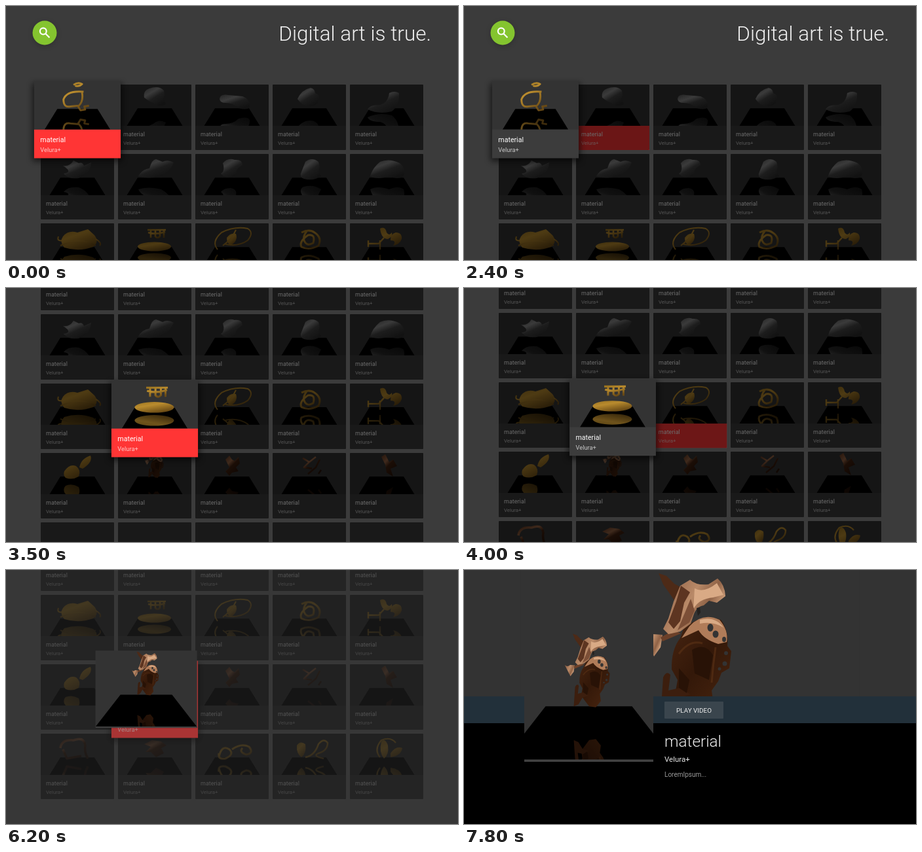
These frames come from a looping animation (690 by 388 pixels, 8100 ms). An HTML page:

```html
<!DOCTYPE html>
<html lang="en">
<head>
<meta charset="utf-8">
<title>Art gallery</title>
<style>
  html, body { margin: 0; width: 100%; height: 100%; overflow: hidden; background: #3b3b3b; }
  #stage { display: block; width: 100vw; height: 100vh; font-family: Roboto, sans-serif; }
</style>
</head>
<body>
<svg id="stage" viewBox="0 0 690 388">
  <defs>
    <linearGradient id="silver" x2=".7" y2="1">
      <stop offset="0" stop-color="#555"/><stop offset=".35" stop-color="#8c8c8c"/>
      <stop offset=".6" stop-color="#444"/><stop offset="1" stop-color="#2a2a2a"/>
    </linearGradient>
    <linearGradient id="gold" x2=".6" y2="1">
      <stop offset="0" stop-color="#99721f"/><stop offset=".4" stop-color="#ba8c2e"/>
      <stop offset="1" stop-color="#694a15"/>
    </linearGradient>
    <linearGradient id="copper" x2=".7" y2="1">
      <stop offset="0" stop-color="#5c321c"/><stop offset=".35" stop-color="#966444"/>
      <stop offset=".55" stop-color="#40200f"/><stop offset="1" stop-color="#281207"/>
    </linearGradient>
    <linearGradient id="sheet" x2="1" y2=".5">
      <stop offset="0" stop-color="#8a5a40"/><stop offset=".5" stop-color="#b98a68"/>
      <stop offset=".75" stop-color="#8f6246"/><stop offset="1" stop-color="#e0b08a"/>
    </linearGradient>
    <linearGradient id="body" x2=".8" y2="1">
      <stop offset="0" stop-color="#482511"/><stop offset=".5" stop-color="#331809"/>
      <stop offset="1" stop-color="#47240f"/>
    </linearGradient>
    <clipPath id="floor"><path d="M28 37.5H84L112 73.5H0Z"/></clipPath>
    <filter id="soft" x="-20%" y="-20%" width="140%" height="140%">
      <feGaussianBlur stdDeviation="4"/>
    </filter>
    <g id="arts"></g>
  </defs>

  <rect width="690" height="388" fill="#3b3b3b"/>
  <g id="grid"></g>
  <g id="header">
    <circle cx="59" cy="43" r="18" opacity=".22" filter="url(#soft)"/>
    <circle cx="59" cy="41" r="18.5" fill="#84c42f"/>
    <g fill="none" stroke="#fff" stroke-width="2.2">
      <circle cx="56.8" cy="38.6" r="4.9"/><path d="M60.4 42.2L66.4 48.2"/>
    </g>
    <text x="649" y="53" font-size="31.5" font-weight="300" text-anchor="end" fill="#f0f0f0">Digital art is true.</text>
  </g>

  <rect id="veil" width="690" height="388" fill="#333"/>
  <g id="backdrop"></g>
  <g id="panel">
    <rect y="193" width="690" height="41" fill="#22303a"/>
    <rect y="234" width="690" height="400" fill="#000"/>
    <rect x="306" y="201" width="90" height="26" rx="1" fill="#3a454d"/>
    <text x="351" y="218" font-size="9.9" text-anchor="middle" fill="#f0f0f0">PLAY VIDEO</text>
    <text x="306" y="270" font-size="24.3" font-weight="300" fill="#eee">material</text>
    <text x="306" y="293" font-size="11.5" fill="#e6e6e6">Velura+</text>
    <text x="306" y="316" font-size="10" fill="#999">LoremIpsum...</text>
  </g>
  <g id="hero"></g>
</svg>

<script>
const LOOP = 8100, COLS = 5, ROWS = 5;
const RED = '#ff3535', GREY = '#3c3c3c';
const $ = id => document.getElementById(id);
const clamp = x => Math.max(0, Math.min(1, x));
const ramp = (t, start, span) => clamp((t - start) / span);
const easeOut = x => 1 - (1 - x) ** 3;
const easeBoth = x => x < .5 ? 2 * x * x : 1 - 2 * (1 - x) ** 2;
const mix = (a, b, p) => a + (b - a) * p;

// Sculptures: material, filled outline, wire, wire width
const solid = (tone, fill) => [tone, fill, '', 0];
const wire = (tone, line, width = 3) => [tone, '', line, width];

const smooth = [
  wire('gold', 'M51 5q6-4 11-1q-4 4-9 2M64 14Q42 12 38 24Q38 35 47 33L58 32Q64 26 62 15M57 33L60 38 66 37 65 33 71 32', 2.5),
  solid('silver', 'M40 20Q38 9 48 6Q62 1 70 9Q72 16 69 21L73 30Q62 36 54 28Q48 26 40 20Z'),
  solid('silver', 'M37 22Q38 14 50 16L72 18Q84 22 83 34Q80 40 66 36Q58 28 46 28Q38 28 37 22Z'),
  solid('silver', 'M38 22Q44 8 58 5Q64 6 65 13Q72 16 71 22Q68 34 56 33Q44 32 38 22Z'),
  solid('silver', 'M27 38Q30 31 46 31Q58 28 60 13Q68 9 75 13Q76 32 64 41Q44 46 27 38Z')
];
const hats = [
  'M34 18Q44 20 50 10L58 14Q64 12 66 18L77 13Q76 30 58 37Q42 39 35 30Q50 28 34 18Z',
  'M31 34Q36 24 48 22Q52 8 58 8L68 12Q76 8 85 13Q80 26 66 34Q46 39 31 34Z',
  'M39 30Q46 26 42 14Q50 5 60 9Q72 8 72 17Q66 20 62 26Q64 34 54 36Q44 36 39 30Z',
  'M43 30L50 12Q60 4 70 12Q73 18 70 26L74 34Q62 42 48 38Q42 36 43 30Z',
  'M31 34Q34 22 46 12Q60 6 76 14Q86 22 82 34Q74 40 60 34Q42 40 31 34Z'
].map(d => solid('silver', d));
const golden = [
  ['gold', 'M34 20Q42 10 56 14L72 9L82 18Q90 28 80 36Q58 44 36 37Q28 28 34 20Z', 'M34 26Q24 28 27 20M30 34Q60 20 84 34M84 24Q94 30 90 34', 2],
  ['gold', 'M30 35.5a25.5 7 0 1 0 51 0a25.5 7 0 1 0-51 0Z', 'M45 10H73M46 14Q58 18 72 13M50 11V22M57 11V20Q60 24 64 20V11M70 11V22', 2.6],
  ['gold', 'M48 22Q54 14 62 16Q66 26 54 34Q48 30 48 22Z', 'M34 40Q24 28 40 14Q60 4 80 8Q90 14 80 26Q66 36 46 32M62 10Q56 24 42 34', 2],
  wire('gold', 'M44 14Q56 8 64 14Q76 22 70 34Q56 42 44 36Q40 28 54 18Q66 16 62 30Q52 36 48 26Q46 20 52 12'),
  ['gold', 'M46 8Q54 4 56 14Q60 20 64 14Q66 20 58 24Q48 24 46 8ZM62 26Q62 16 70 14Q80 14 79 24Q76 32 66 34Q72 26 62 26Z', 'M28 26V36M28 31H44L52 22M46 26V40', 2.4]
];
const mixed = [
  solid('gold', 'M36 28Q44 16 54 20Q62 26 58 36Q48 42 38 38Q34 34 36 28ZM59 22Q62 8 76 4Q80 14 64 24Z'),
  null,
  solid('copper', 'M46 10L52 4L56 10L60 12L66 6L68 16L62 22L66 28L56 30L52 35L46 28L52 22Z'),
  wire('copper', 'M46 8L56 14L66 6M56 14L48 22L60 24M72 10L66 22L54 32M74 26L70 32', 2.6),
  solid('copper', 'M48 6L54 2L60 14L66 10L72 20L62 24L66 36L56 30L54 18Z')
];
const last = [
  wire('copper', 'M30 22Q32 8 50 10Q66 4 68 18Q66 28 72 38M34 24L40 38L62 34', 3.6),
  solid('copper', 'M40 16L52 10L66 12L74 18L66 22L70 30L58 36L50 28L42 28L50 20Z'),
  wire('gold', 'M36 36Q40 16 52 24Q60 32 46 38Q34 40 36 30M56 24Q70 14 82 20Q90 30 78 32Q66 28 72 22'),
  ['gold', 'M37 18Q42 10 50 16Q52 30 44 36Q36 30 37 18Z', 'M50 36Q64 34 70 16Q78 6 84 14Q84 26 70 30Q60 34 78 38', 2.4],
  ['gold', 'M48 12Q54 6 58 18Q60 32 52 38Q44 28 48 12ZM62 30Q70 18 80 22Q78 34 62 36Z', 'M46 36Q36 24 48 10Q62 4 70 14', 2.2]
];
const arts = [smooth, hats, golden, mixed, last];

// The featured sculpture, drawn at full-stage size and scaled down
const figure = `<g transform="translate(-18.68 -10.5) scale(.2165)">
  <path fill="url(#body)" d="M335 90Q362 66 392 76Q404 92 402 116L408 124 405 150 393 157 388 170 378 184 381 206 366 225 346 222 334 206 322 190 326 168 317 152Q316 122 330 104Z"/>
  <path fill="#3c1e0e" d="M300 222L304 164Q309 153 315 160L312 184 330 180 346 190 326 196 314 216Z"/>
  <path fill="url(#sheet)" d="M273 98Q281 106 289 98L303 99 300 118 290 132 283 118Z"/>
  <path fill="#6b4029" d="M300 103L320 92 331 97 303 109Z"/>
  <path fill="#4d2a17" d="M297 5L309 9 321 21 332 27 322 48 314 36 304 22Z"/>
  <path fill="url(#sheet)" d="M330 24L345 15Q355 24 373 22L387 13Q398 22 399 40L386 50 374 47 366 54Q354 56 350 70L346 82 330 94 312 98 304 90 312 74 320 48Z"/>
  <path fill="#5d3521" d="M331 24L324 48 312 80 320 90 330 78 336 50 345 34Z"/>
  <path fill="#d9aa85" d="M352 28Q366 36 386 20L396 38 380 42Q358 44 350 60Z"/>
  <path fill="#7c4f37" d="M346 44L352 62 344 80 326 92Z"/>
  <path fill="#b07c59" d="M344 86Q364 64 390 76Q404 92 401 110L388 113Q366 106 358 92L332 104Z"/>
  <path fill="#d9aa85" d="M360 76Q384 70 396 88Q380 78 360 82Z"/>
  <g fill="#333">
    <ellipse cx="376" cy="88" rx="4.5" ry="6"/><ellipse cx="384" cy="98" rx="4.5" ry="5.5"/>
    <ellipse cx="397" cy="106" rx="3" ry="4"/><circle cx="400" cy="127" r="3"/>
    <circle cx="398" cy="143" r="3.5"/><circle cx="390" cy="151" r="2.5"/>
  </g>
  <path fill="#24211f" d="M355 58l5-1 1 8-4 5z"/>
  <path fill="#281206" d="M348 122Q368 110 380 130L374 168 352 158ZM328 150L344 168 340 188 328 180Z"/>
  <path fill="none" stroke="#5c3217" stroke-width="3" opacity=".6" d="M328 128Q344 106 364 112M384 118Q380 146 378 172"/>
</g>`;

const draw = ([tone, fill, line, width]) =>
  (fill ? `<path fill="url(#${tone})" d="${fill}"/>` : '') +
  (line ? `<path fill="none" stroke="url(#${tone})" stroke-width="${width}" stroke-linejoin="round" d="${line}"/>` : '');

$('arts').innerHTML = arts.map((row, r) => row.map((art, c) =>
  `<g id="art${r}${c}">${art ? draw(art) : figure}</g>`).join('')).join('');

const WIDE = 'M28 37.5H84L112 73.5H0Z', NARROW = 'M30 36.2H82L98.5 63H13.5Z';

// A 4:3 picture: floor, mirrored sculpture, sculpture
function picture(r, c, box, floor = WIDE, fit = 'slice') {
  const mirror = arts[r][c] ? 88 : 97;
  return `<svg ${box} viewBox="0 -10.5 112 84" preserveAspectRatio="xMidYMid ${fit}">
    <rect y="-10.5" width="112" height="84" fill="#333"/>
    <path d="${floor}"/>
    <g clip-path="url(#floor)"><use href="#art${r}${c}" transform="translate(0 ${mirror}) scale(1 -1)" opacity=".6"/></g>
    <use href="#art${r}${c}"/>
    <rect y="72" width="112" height="1.5" fill="#424242"/>
  </svg>`;
}

const cards = [];
for (let r = 0; r < ROWS; r++) for (let c = 0; c < COLS; c++) {
  const g = document.createElementNS('http://www.w3.org/2000/svg', 'g');
  g.innerHTML = `<rect class="shadow" x="-2" y="3" width="116" height="101" filter="url(#soft)"/>
    <rect class="back" width="112" height="64" rx="1"/>
    ${picture(r, c, 'class="pic" width="112" height="63"', NARROW)}
    <rect class="info" y="63" width="112" height="37"/>
    <text x="8" y="79" font-size="9" fill="#fff">material</text>
    <text x="8" y="92" font-size="7.9" fill="#fff" opacity=".72">Velura+</text>
    <rect class="dim" width="112" height="100" rx="1"/>`;
  $('grid').append(g);
  const card = { r, c, g };
  for (const name of ['shadow', 'back', 'pic', 'info', 'dim']) card[name] = g.querySelector('.' + name);
  cards.push(card);
}

$('backdrop').innerHTML = picture(3, 1, 'width="690" height="388"', WIDE, 'meet');
$('hero').innerHTML = picture(3, 1, '');
const hero = $('hero').firstElementChild;

// Highlight moves: time, row, column, and whether the card also grows
const moves = [
  [0, 0, 0, true], [2400, 0, 1, false], [2810, 1, 1, true], [3250, 2, 1, true],
  [4000, 2, 2, true], [4350, 3, 2, true], [5100, 3, 1, true]
];
const grows = moves.filter(m => m[3]);
const scrolls = [[2810, 82], [3250, 106], [4350, 106]];
const OPEN = 6100;

function growth(card, t) {
  let p = 0;
  grows.forEach(([at, r, c], i) => {
    if (r !== card.r || c !== card.c) return;
    const up = i ? easeOut(ramp(t, at, 200)) : 1;
    const next = grows[i + 1];
    p = Math.max(p, up - (next ? easeOut(ramp(t, next[0], 200)) : 0));
  });
  return p;
}

function drawGrid(t) {
  const scroll = scrolls.reduce((y, [at, by]) => y + by * easeOut(ramp(t, at, 340)), 0);
  const [, row, col] = moves.filter(m => m[0] <= t).pop();
  $('header').setAttribute('transform', `translate(0 ${-scroll})`);
  const raised = [];
  for (const card of cards) {
    const { r, c } = card;
    const p = growth(card, t), lit = r === row && c === col;
    const opened = lit && t > OPEN;
    const x = 109 + 118 * c, y = 170 + 106 * r - scroll + 3.5 * p;
    card.g.setAttribute('transform', `translate(${x} ${y}) scale(${1 + .18 * p}) translate(-56 -50)`);
    card.info.setAttribute('fill', lit ? RED : GREY);
    card.back.setAttribute('fill', opened ? RED : GREY);
    card.dim.setAttribute('opacity', .58 * (1 - p));
    card.shadow.setAttribute('opacity', .6 * p);
    const loaded = r < 3 ? 1 : ramp(t, r === 3 ? 3300 : 3550, 200);
    card.pic.setAttribute('opacity', opened ? 0 : loaded);
    if (p > 0) raised.push([p, card.g]);
  }
  raised.sort((a, b) => a[0] - b[0]).forEach(([, g]) => {
    if (raised.length > 1 || g !== $('grid').lastChild) $('grid').append(g);
  });
}

function drawDetails(t) {
  const p = ramp(t, OPEN, 240), q = easeBoth(p);
  const slide = easeOut(ramp(t, 6300, 350));
  const box = { x: mix(161, 92, q), y: mix(138.5, 95, q), width: mix(132, 197, q), height: mix(74.3, 198, q) };
  for (const k in box) hero.setAttribute(k, box[k]);
  $('hero').setAttribute('display', t > OPEN ? 'inline' : 'none');
  $('veil').setAttribute('opacity', p);
  $('panel').setAttribute('transform', `translate(0 ${195 * (1 - slide)})`);
  $('panel').setAttribute('opacity', slide);
  $('backdrop').setAttribute('opacity', ramp(t, 6600, 400));
}

function frame() {
  const t = performance.now() % LOOP;
  drawGrid(t);
  drawDetails(t);
  requestAnimationFrame(frame);
}
frame();
</script>
</body>
</html>
```
